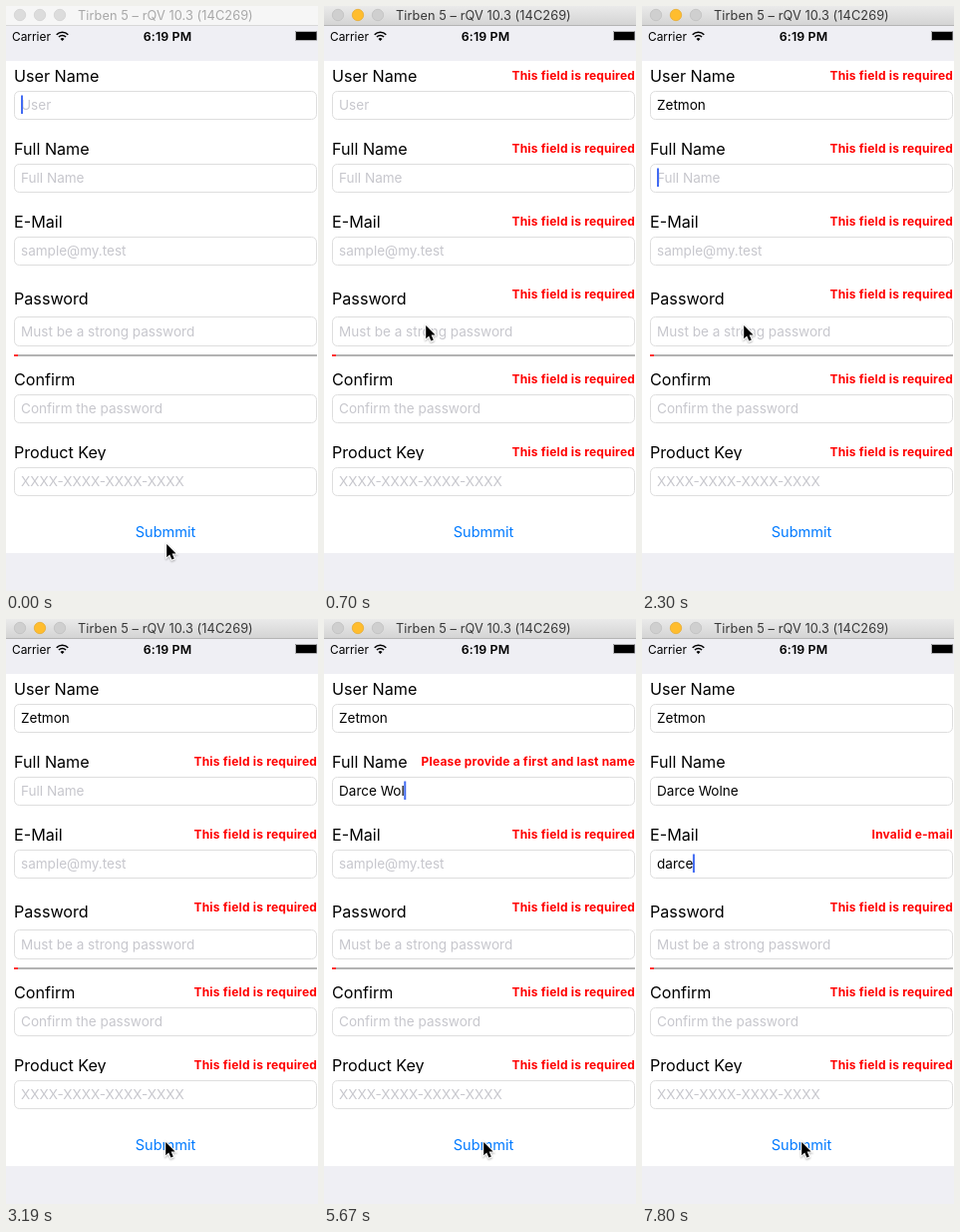
Recreate the animation shown at these times as an HTML page with a canvas. Size 313 by 586 pixels, loop 8 s.

```html
<!DOCTYPE html>
<html lang="en">
<head>
<meta charset="utf-8">
<title>Form validation</title>
<style>
  html, body { margin: 0; width: 100%; height: 100%; overflow: hidden; }
  canvas { display: block; width: 313px; height: 586px; }
</style>
</head>
<body>
<canvas id="stage"></canvas>
<script>
const W = 313, H = 586, LOOP = 8000;
const canvas = document.getElementById('stage');
const ctx = canvas.getContext('2d');
const ratio = window.devicePixelRatio || 1;
canvas.width = W * ratio;
canvas.height = H * ratio;
ctx.scale(ratio, ratio);

// y: top of the input box, label and error: text baselines
const fields = [
  { label: 'User Name',   hint: 'User',                      y: 85,  labelY: 76,  errorY: 74.4,  value: 'Zetmon' },
  { label: 'Full Name',   hint: 'Full Name',                 y: 158, labelY: 149, errorY: 147.4, value: 'Darce Wolne' },
  { label: 'E-Mail',      hint: 'sample@my.test',            y: 231, labelY: 222, errorY: 220.4, value: 'darce' },
  { label: 'Password',    hint: 'Must be a strong password', y: 311, labelY: 299, errorY: 293.4, value: '' },
  { label: 'Confirm',     hint: 'Confirm the password',      y: 389, labelY: 380, errorY: 378.4, value: '' },
  { label: 'Product Key', hint: 'XXXX-XXXX-XXXX-XXXX',       y: 462, labelY: 453, errorY: 451.4, value: '' }
];

// [time, focused field, characters typed]
const keys = [
  [-180, 0, 0], [1150, 0, 1], [1600, 0, 2], [1680, 0, 3], [1950, 0, 4], [2040, 0, 5], [2120, 0, 6],
  [2300, 1, 0], [3540, 1, 1], [3810, 1, 2], [3990, 1, 4], [4080, 1, 5], [4780, 1, 6], [5320, 1, 7],
  [5580, 1, 8], [5670, 1, 9], [5760, 1, 10], [5850, 1, 11],
  [6550, 2, 0], [7080, 2, 1], [7170, 2, 3], [7260, 2, 5]
];

// [time, x, y] of the pointer tip
const pointerPath = [
  [0, 161.2, 539], [270, 160, 527], [360, 160, 526], [690, 102.2, 320],
  [2480, 102.2, 320], [2840, 161, 535], [2930, 160.2, 524]
];

const ACTIVATE = 180, SUBMIT = 350;

function text(str, x, y, size, color, { weight = 400, align = 'left', tracking = 0 } = {}) {
  ctx.font = `${weight} ${size}px Inter, sans-serif`;
  ctx.letterSpacing = `${tracking}px`;
  ctx.fillStyle = color;
  ctx.textAlign = align;
  ctx.fillText(str, x, y);
}

function rect(x, y, w, h, color) {
  ctx.fillStyle = color;
  ctx.fillRect(x, y, w, h);
}

function titleBar(active) {
  const shade = ctx.createLinearGradient(0, 0, 0, 20);
  shade.addColorStop(0, active ? '#eaeaea' : '#f6f6f6');
  shade.addColorStop(1, active ? '#d3d3d3' : '#f6f6f6');
  rect(0, 0, W, 20, shade);
  rect(0, 19, W, 1, active ? '#b4b4b4' : '#d8d8d8');
  [14, 34, 54].forEach((x, i) => {
    const lit = active && i === 1;
    ctx.beginPath();
    ctx.arc(x, 9, 5.7, 0, 7);
    ctx.fillStyle = lit ? '#ffbd2e' : active ? '#cfcfcf' : '#dcdcdc';
    ctx.strokeStyle = lit ? '#e6a82a' : active ? '#bdbdbd' : '#cfcfcf';
    ctx.lineWidth = 0.7;
    ctx.fill();
    ctx.stroke();
  });
  text('Tirben 5 – rQV 10.3 (14C269)', 72, 14, 12.75, active ? '#383838' : '#a8a8a8', { tracking: 0.08 });
}

function statusBar() {
  text('Carrier', 6, 34.5, 11.9, '#000');
  text('6:19 PM', 162, 34.5, 12.4, '#000', { weight: 600, align: 'center', tracking: 0.12 });
  ctx.strokeStyle = '#000';
  ctx.lineWidth = 1.6;
  for (const r of [5, 8.2]) {
    ctx.beginPath();
    ctx.arc(56.5, 34.5, r, -Math.PI * 0.75, -Math.PI * 0.25);
    ctx.stroke();
  }
  ctx.beginPath();
  ctx.moveTo(56.5, 35);
  ctx.arc(56.5, 35, 2.8, -Math.PI * 0.75, -Math.PI * 0.25);
  ctx.fillStyle = '#000';
  ctx.fill();
  ctx.strokeStyle = '#777';
  ctx.lineWidth = 0.5;
  ctx.strokeRect(290.4, 25.4, 21.4, 9.2);
  rect(291, 26, 20.5, 8, '#000');
}

function errorOf(i, t) {
  if (t < SUBMIT) return '';
  if (i === 0 && t >= 2565) return '';
  if (i === 1 && t >= 6285) return '';
  if (i === 1 && t >= 4515) return 'Please provide a first and last name';
  if (i === 2 && t >= 7705) return 'Invalid e-mail';
  return 'This field is required';
}

function caretAlpha(age) {
  const phase = age % 530;
  return phase < 258 ? 1 : phase < 345 ? 0.5 : 0;
}

function drawField(field, i, t, key) {
  const [time, focus, count] = key;
  const typed = i < focus ? field.value : i === focus ? field.value.slice(0, count) : '';
  const height = i === 3 ? 29 : 28;
  const baseline = field.y + (i === 3 ? 19.5 : 19);

  text(field.label, 8, field.labelY, 16.15, '#000');
  if (i === 5) rect(8, 455, 150, 5, '#fff');
  text(errorOf(i, t), 312, field.errorY, 12, '#f00', { weight: 700, align: 'right', tracking: 0.19 });

  ctx.beginPath();
  ctx.roundRect(8.5, field.y + 0.5, 303, height, 5);
  ctx.strokeStyle = '#dedede';
  ctx.lineWidth = 1;
  ctx.stroke();
  text(typed || field.hint, 15, baseline, 13.55, typed ? '#000' : '#c7c7cd');

  if (i === focus) {
    const x = 15 + (typed ? ctx.measureText(typed).width - 0.5 : 0);
    ctx.globalAlpha = caretAlpha(t - time);
    rect(x, field.y + 4.5, 2, 18.5, '#426bf2');
    ctx.globalAlpha = 1;
  }
}

function pointerAt(t) {
  const next = pointerPath.findIndex(p => p[0] > t);
  if (next < 0) return pointerPath.at(-1).slice(1);
  const [t0, x0, y0] = pointerPath[next - 1];
  const [t1, x1, y1] = pointerPath[next];
  const u = (t - t0) / (t1 - t0);
  const k = u * u * (3 - 2 * u);
  return [x0 + (x1 - x0) * k, y0 + (y1 - y0) * k];
}

function drawPointer([x, y]) {
  ctx.save();
  ctx.translate(x, y);
  const arrow = new Path2D('M0 0V13.2L3 10.4L5.2 15.6L7.6 14.6L5.4 9.6H9.4Z');
  ctx.shadowColor = 'rgba(0,0,0,.3)';
  ctx.shadowBlur = 2 * ratio;
  ctx.shadowOffsetY = ratio;
  ctx.strokeStyle = '#fff';
  ctx.lineWidth = 2;
  ctx.stroke(arrow);
  ctx.shadowColor = 'transparent';
  ctx.fillStyle = '#000';
  ctx.fill(arrow);
  ctx.restore();
}

function draw(t) {
  rect(0, 0, W, H, '#efeff4');
  rect(0, 55, W, 493, '#fff');
  titleBar(t >= ACTIVATE);
  statusBar();
  const key = keys.findLast(k => k[0] <= t);
  fields.forEach((field, i) => drawField(field, i, t, key));
  rect(8, 349, 304, 2, '#b3b3b3');
  rect(8, 349, 4, 2, '#f33');
  text('Submmit', 160, 532, 14.5, '#007aff', { align: 'center' });
  drawPointer(pointerAt(t));
}

const start = performance.now();
function tick() {
  draw((performance.now() - start) % LOOP);
  requestAnimationFrame(tick);
}
tick();
</script>
</body>
</html>
```
